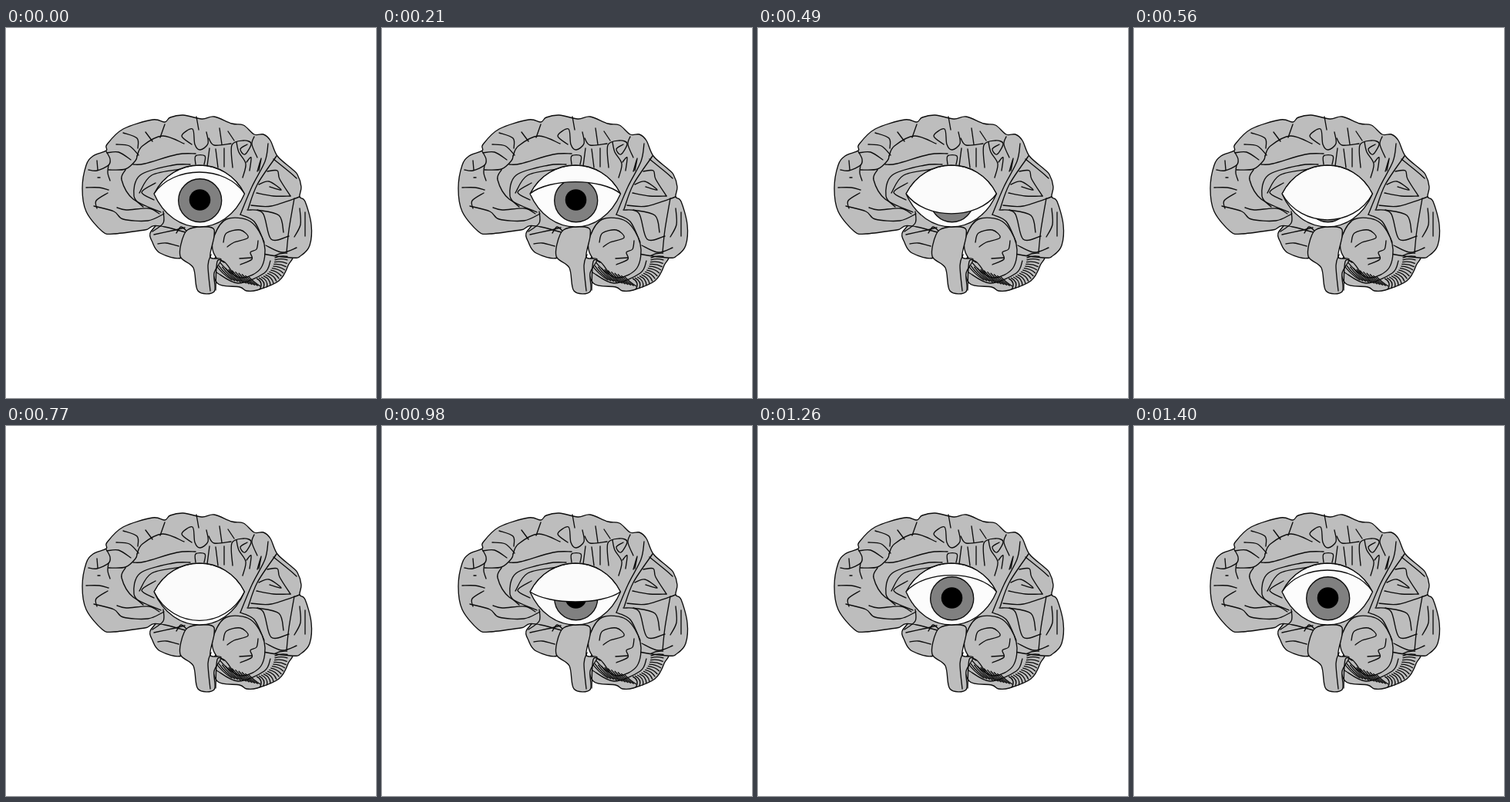
Write an HTML page that moves like this. It is 480 px wide and 480 px high and loops after 1470 ms.

```html
<!DOCTYPE html>
<html>
<head>
<meta charset="utf-8">
<title>Blinking brain</title>
<style>
html, body { margin: 0; width: 100%; height: 100%; overflow: hidden; background: #fff; }
svg { display: block; width: 100vw; height: 100vh; }
</style>
</head>
<body>
<svg viewBox="0 0 480 480" fill="none" stroke="#0c0c0c" stroke-width="1.35" stroke-linecap="round" stroke-linejoin="round">
  <g id="brain"></g>
  <clipPath id="opening"><path id="shape"/></clipPath>
  <g clip-path="url(#opening)">
    <rect x="185" y="170" width="130" height="95" fill="#fcfcfc" stroke="none"/>
    <circle cx="251.7" cy="223.7" r="28" fill="#808080"/>
    <circle cx="251.5" cy="223" r="13.8" fill="#000" stroke="none"/>
    <path id="lid" fill="#fbfbfb"/>
  </g>
  <path id="rim"/>
</svg>
<script>
const get = id => document.getElementById(id);
const GRAY = '#bdbdbd';

// Smooth curve through the given points
function curve(text, closed) {
  const p = text.trim().split(/\s+/).map(s => s.split(',').map(Number));
  const n = p.length;
  const at = i => closed ? p[(i + n) % n] : p[Math.max(0, Math.min(n - 1, i))];
  let d = 'M' + p[0];
  for (let i = 0; i < (closed ? n : n - 1); i++) {
    const [a, b, c, e] = [at(i - 1), at(i), at(i + 1), at(i + 2)];
    const c1 = b.map((v, k) => v + (c[k] - a[k]) / 6);
    const c2 = c.map((v, k) => v - (e[k] - b[k]) / 6);
    d += `C${c1} ${c2} ${c}`;
  }
  return d;
}

function draw(d, fill) {
  const el = document.createElementNS('http://www.w3.org/2000/svg', 'path');
  el.setAttribute('d', d);
  if (fill) el.setAttribute('fill', fill);
  get('brain').appendChild(el);
}

const blob = text => draw(curve(text, true), GRAY);
const fold = text => draw(curve(text));

function cerebellum() {
  blob('270,300 300,285 367,293 366,308 354,328 326,340 312,341 303,336 274,331');
}

function cerebrum() {
  blob('188,264 190,278 200,292 228,298 245,275 210,250');
  blob(`99,208 104,178 113,166 130,159 131,151 152,131 190,119 206,122 213,116 230,113
    254,118 270,115 293,124 308,126 322,138 334,138 343,146 352,166 370,182 378,190
    383,206 381,219 388,225 396,255 394,282 383,295 370,298 320,290 206,258
    180,262 140,267 125,264 104,238`);
}

function frontal() {
  fold('107,184 118,185 133,178 135,170 130,160');
  fold('118,172 119,184');
  fold('104,207 121,207 133,210');
  fold('133,178 132,188 135,198');
  fold('119,194 122,194');
  fold('118,234 117,224 132,214');
  fold('114,231 140,238 152,248 184,250 205,241');
  fold('144,233 156,236 185,234 199,241');
  fold('133,184 155,183 168,172 170,166');
  fold('131,162 146,161 162,171');
  fold('143,151 160,153 172,165');
  fold('152,136 170,143 171,156');
  fold('181,135 190,147');
  fold('206,125 200,142');
  fold('170,166 177,153 203,140 231,150');
  fold('165,177 180,176 222,164 246,163');
  fold('155,184 150,197 165,222 201,239');
  fold('178,232 166,218 174,191 216,178 239,177');
  fold('173,214 189,191 228,183');
  fold('192,223 176,213 194,201');
  fold('190,264 204,253 204,238');
  fold('192,268 215,263 232,259');
  fold('197,280 208,279 224,283');
  fold('221,266 227,258 234,263');
}

function upper() {
  fold('241,151 228,140 242,131 245,151 252,158 262,150 260,135');
  fold('247,115 250,132');
  fold('263,143 270,152 292,150');
  fold('277,130 280,151');
  fold('288,134 296,146');
  fold('246,177 246,166 258,166 257,177');
  fold('264,156 261,179');
  fold('272,157 275,181');
  fold('283,156 283,180');
}

function rear() {
  fold('294,181 293,152 308,146 318,150 310,164 304,157 313,151');
  fold('299,148 302,161 311,176 307,194');
  fold('312,174 318,168 316,185');
  fold('322,141 319,151 326,168');
  fold('326,186 331,169 328,185');
  fold('340,150 336,173 319,206 304,242');
  fold('351,166 326,203 314,235');
  fold('347,170 368,187 377,195');
  fold('328,203 341,199 357,210 342,206');
  fold('339,186 352,185 355,196 369,218');
  fold('325,214 347,218 369,218');
  fold('318,230 344,231 381,219');
  fold('313,236 333,240 344,274 367,270');
  fold('326,236 354,243 360,265');
  fold('374,221 367,262 364,291');
  fold('381,234 382,255 374,271');
  fold('388,239 388,270');
  fold('337,282 358,291 377,285');
  fold('304,242 322,251 335,278');
}

function core() {
  blob('270,270 286,248 317,251 335,280 331,311 307,324 287,314 269,291');
  fold('282,278 286,266 304,262 314,272 296,278 287,284');
  fold('327,276 325,287 317,291 319,300 304,307');
  fold('303,299 319,298');
  fold('272,300 284,304 295,319');
}

// Fans of short strokes under the core
function ridges() {
  for (let i = 0; i < 15; i++) {
    const a = (i * 6 - 8) * Math.PI / 180, c = Math.cos(a), s = Math.sin(a);
    draw(`M${318 + 31 * c} ${299 + 27 * s}Q${327 + 30 * c} ${296 + 35 * s} ${318 + 47 * c} ${298 + 42 * s}`);
  }
  for (let i = 0; i < 11; i++) {
    draw(`M${272 + i * 4.3} ${307 + i * 1.6}q8 ${12 - i * .4} ${21 - i * .6} ${20 - i * .8}`);
  }
  fold('273,317 301,331 335,318 343,302');
}

function stem() {
  blob('243,259 267,259 270,270 265,297 279,300 270,318 270,342 249,341 243,311 226,296 231,268');
  fold('266,294 262,308 265,341');
  fold('283,304 274,303 272,340');
}

[cerebellum, cerebrum, frontal, upper, rear, core, ridges, stem].forEach(part => part());

// Almond between two edges whose middles sit at heights top and low
function almond(top, low) {
  const [a, b] = [top, low].map(m => (m - 53.75) / .75);
  return `M192 215C217 ${a} 285 ${a} 309.5 215C285 ${b} 217 ${b} 192 215Z`;
}

get('shape').setAttribute('d', almond(178, 258));
get('rim').setAttribute('d', almond(178, 258));

const STEP = 70, COUNT = 21;
const steps = [0, 5, 8, 11, 14, 16, 20];
const phases = [0, 86, 148, 198, 257, 287, 360];

function lidHeight(k) {
  let i = 1;
  while (k > steps[i]) i++;
  const f = (k - steps[i - 1]) / (steps[i] - steps[i - 1]);
  const a = phases[i - 1] + f * (phases[i] - phases[i - 1]);
  return 187 + 33.5 * (1 - Math.cos(a * Math.PI / 180));
}

function render(t) {
  const k = Math.floor(t / STEP) % COUNT;
  get('lid').setAttribute('d', almond(178, lidHeight(k)));
}

let start;
function tick(now) {
  start ??= now;
  render(Math.max(0, now - start));
  requestAnimationFrame(tick);
}
render(0);
requestAnimationFrame(tick);
</script>
</body>
</html>
```
